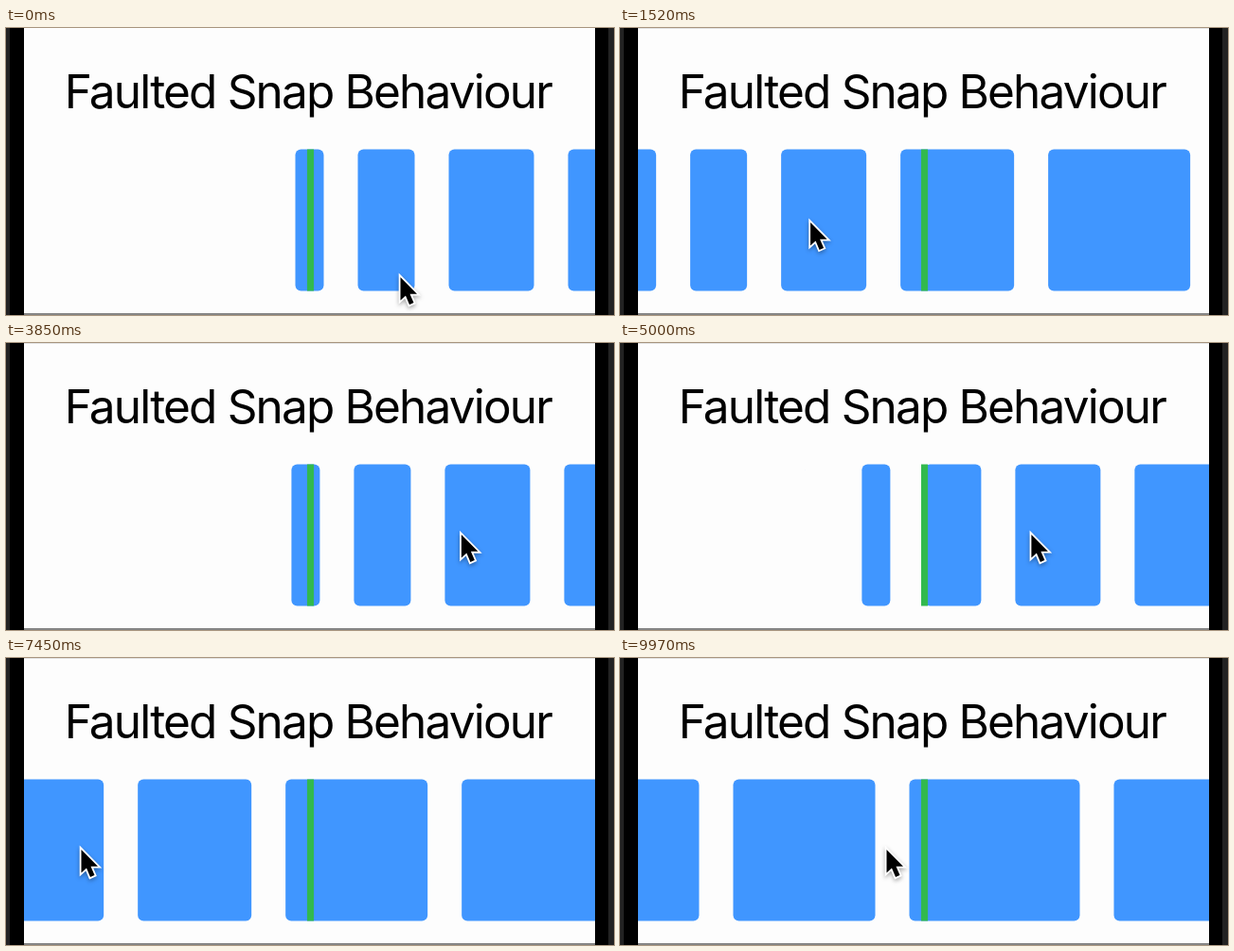
Write an HTML page that moves like this. It is 642x304 px and loops after 10000 ms.

```html
<!DOCTYPE html>
<html lang="en">
<head>
<meta charset="utf-8">
<title>Faulted Snap Behaviour</title>
<style>
  html, body { margin: 0; width: 100%; height: 100%; overflow: hidden; background: #fdfdfd; }
  svg { display: block; }
  text { font: 49.5px Inter, "Open Sans", sans-serif; letter-spacing: -1.83px; }
  #cards { fill: #4096ff; }
  #cursor { stroke: #fff; stroke-width: 3.6; paint-order: stroke; filter: drop-shadow(0 2px 2px #0005); }
</style>
</head>
<body>
<svg width="642" height="304" viewBox="0 0 642 304">
  <rect width="642" height="304" fill="#fdfdfd"/>
  <rect id="topLine" width="642" height="1" fill="#e2e2e2"/>
  <text x="61.7" y="85.2">Faulted Snap Behaviour</text>
  <g id="cards"></g>
  <rect x="318" y="128.5" width="7" height="150" fill="#32b94e"/>
  <rect y="302" width="642" height="2" fill="#858585"/>
  <path d="M0 0H19V304H0ZM622 0H642V304H622Z"/>
  <path d="M0 0H4V304H0ZM636 0H642V304H636Z" fill="#222"/>
  <path id="cursor" d="M0 0V24.5L5.5 19.5 9.5 29 14 27 10 17.8H17.5Z"/>
</svg>
<script>
const LOOP = 10000, GAP = 36;
const GRAB = 430, RELEASE = 7330, SETTLED = 9330, LEAVE = 9490;
const REST = -324.5, GLIDE = 225;

// Turning and passing points of the drag: [time, left edge of the first card]
const drag = [
  [GRAB, 305.5], [1390, 2], [2450, 196], [3090, 234], [4140, 312],
  [5165, 241], [6210, 143.5], [RELEASE, REST + GLIDE], [7450, -148.5]
];

const $ = id => document.getElementById(id);
const clamp = (v, lo, hi) => Math.min(hi, Math.max(lo, v));
const ease = v => { const u = clamp(v, 0, 1); return u * u * (3 - 2 * u); };
const slope = (a, b) => (b[1] - a[1]) / (b[0] - a[0]);

// Each card is 30px wider than the one before it.
let left = 0, cardMarkup = '';
for (let width = 30; width <= 240; width += 30) {
  cardMarkup += `<rect x="${left}" y="128.5" width="${width}" height="150" rx="6"/>`;
  left += width + GAP;
}
$('cards').innerHTML = cardMarkup;

// Tangent at a key: flat at the ends and at turning points.
function tangent(keys, i) {
  const before = keys[i - 1], key = keys[i], after = keys[i + 1];
  if (!before || !after || slope(before, key) * slope(key, after) <= 0) return 0;
  return slope(before, after);
}

function sample(keys, t) {
  const i = keys.findIndex(k => k[0] > t) - 1;
  const [t0, a] = keys[i], [t1, b] = keys[i + 1];
  const span = t1 - t0, u = (t - t0) / span, v = 1 - u;
  return a + (b - a) * ease(u)
    + span * u * v * (v * tangent(keys, i) - u * tangent(keys, i + 1));
}

function scrollAt(t) {
  if (t < RELEASE) return sample(drag, Math.max(t, GRAB));
  const rest = 1 - clamp((t - RELEASE) / (SETTLED - RELEASE), 0, 1);
  return REST + GLIDE * rest ** 4;
}

// The pointer holds the cards at a slowly slipping point between grab and release.
function cursorAt(t) {
  const held = clamp(t, GRAB, RELEASE);
  const grip = 185 - 7 * Math.tanh((held - 3000) / 500);
  const arrive = -82 * (1 - ease(t / GRAB));
  const leave = 202 * ease((t - LEAVE) / 480);
  return [scrollAt(held) + grip + arrive + leave, 201 + 61 * Math.exp(-t / 500)];
}

function draw(now) {
  const t = now % LOOP;
  const [x, y] = cursorAt(t);
  $('cards').setAttribute('transform', `translate(${scrollAt(t)})`);
  $('cursor').setAttribute('transform', `translate(${x + 1} ${y + 2})`);
  $('topLine').setAttribute('visibility', t < 30 ? 'hidden' : 'visible');
}

let start;
function tick(now) {
  start ??= now;
  draw(now - start);
  requestAnimationFrame(tick);
}
draw(0);
requestAnimationFrame(tick);
</script>
</body>
</html>
```
